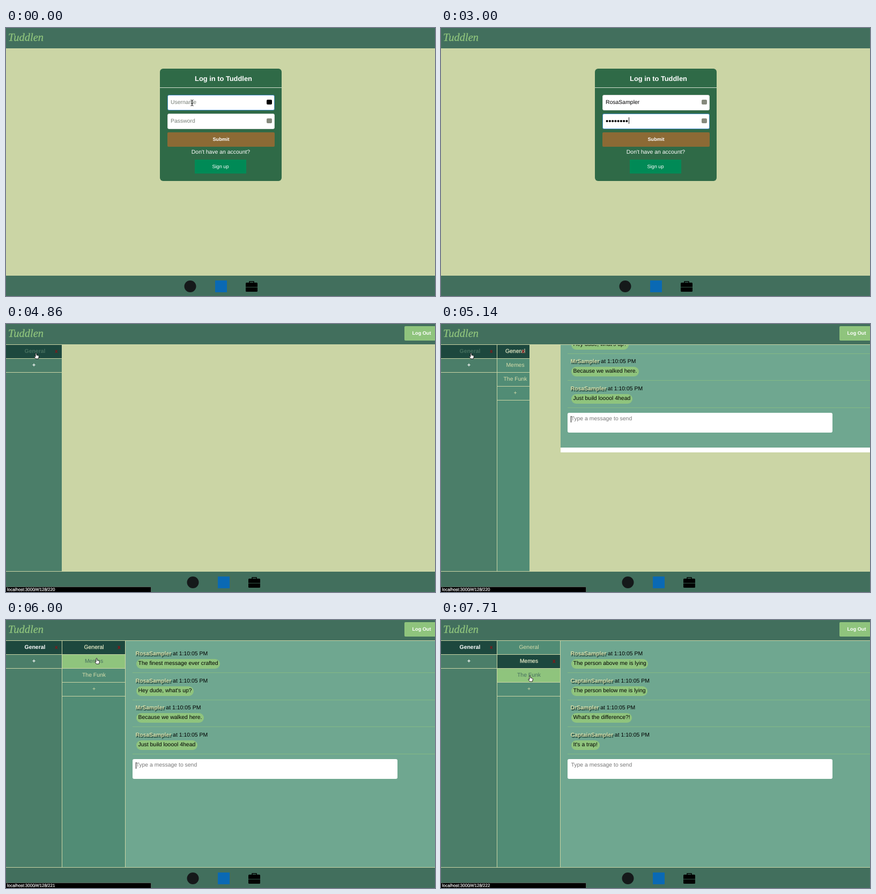
An HTML page that plays this animation: 800 by 501 pixels, repeating every 8000 ms.

```html
<!DOCTYPE html>
<html lang="en">
<head>
<meta charset="utf-8">
<title>Chat login</title>
<style>
  :root { --bar: #426f5d; --cream: #cbd5a5; --lime: #8fc47d; --dark: #1d483e; }
  html, body { margin: 0; width: 100%; height: 100%; overflow: hidden; }
  body { font: 10.45px "Liberation Sans", Arial, sans-serif; text-rendering: geometricPrecision; background: var(--cream); }
  #stage { position: relative; width: 800px; height: 501px; overflow: hidden; background: var(--cream); }
  #stage div, #stage svg { position: absolute; box-sizing: border-box; white-space: nowrap; }
  .mid { text-align: center; }
  .bold { font-weight: bold; }
  .hide { visibility: hidden; }

  #head { left: 0; top: 0; width: 800px; height: 39px; background: var(--bar); border-bottom: 1px solid var(--cream); }
  #logo { left: 4px; top: 5px; font: italic 20.5px/26px "Liberation Serif", serif; color: var(--lime); -webkit-text-stroke: .3px; }
  #logout { left: 743px; top: 4px; width: 64px; height: 27px; line-height: 27px; border-radius: 2px;
    background: var(--lime); color: #fff; font-size: 9.15px; }
  #foot { left: 0; top: 462px; width: 800px; height: 39px; background: var(--bar); border-top: 1px solid var(--cream); }
  #icons { left: 0; top: 0; }

  #card { left: 287px; top: 76px; width: 227px; height: 210px; border-radius: 6px; background: #2f6a47; color: #fff; }
  #title { left: 5px; top: 0; width: 227px; line-height: 38px; font-size: 12.85px; }
  #rule { left: 0; top: 35px; width: 227px; height: 1px; background: #d5e0d0; }
  .field { left: 14px; width: 200px; height: 29px; line-height: 27px; padding-left: 5px; border-radius: 3px;
    border: 1px solid #d9dcd9; background: #fff; color: #000; }
  .field.on { border-color: #4a8fca; }
  .hint { color: #757d75; }
  .key { left: 184px; top: 8px; width: 10px; height: 9px; border-radius: 2px; background: #85897c; }
  .key.hot { background: #000; }
  .caret { display: inline-block; width: 1px; height: 12px; margin-left: .5px; vertical-align: -2px; background: #111; }
  .dots { font-size: 15px; line-height: 1px; vertical-align: -1.5px; }
  #submit { left: 14px; top: 119px; width: 200px; height: 27px; line-height: 27px; border-radius: 2px;
    background: #8c6a35; font-size: 9.15px; }
  #ask { left: 0; top: 150px; width: 227px; line-height: 14px; }
  #join { left: 65px; top: 170px; width: 96px; height: 26px; line-height: 26px; background: #008a56; font-size: 9.2px; }

  #servers, #rooms { top: 39px; height: 423px; overflow: hidden; border-right: 1px solid var(--cream); }
  #servers { left: 0; width: 105px; background: #4b7e69; }
  #rooms { left: 105px; background: #518c75; }
  .row { left: 0; width: 100%; height: 26px; line-height: 25px; border-bottom: 1px solid var(--cream); }
  .name { left: 0; width: 100%; }
  #servers .row { color: #fff; font-weight: bold; }
  #servers .name { left: 2px; }
  #rooms .row { color: #d5dcaa; }
  .row.sel { background: var(--dark); }
  #rooms .row.sel { color: #e2e8c4; -webkit-text-stroke: .25px; }
  .row.over { background: var(--lime); }
  #stage .row.over { color: #47705f; }
  #stage .row.sel { background: var(--dark); }
  #stage .kill { display: none; color: #8a1518; font: bold 10px/26px "Liberation Sans", Arial, sans-serif; }
  #stage .sel .kill { display: block; }

  #panel { left: 223px; top: 39px; width: 577px; overflow: hidden; background: #6fa790; }
  #white { left: 223px; width: 577px; height: 9px; background: #fff; }
  #list { left: 0; width: 577px; height: 286px; }
  .msg { left: 13px; width: 564px; height: 51px; border-bottom: 1px solid #84b985; }
  .who { left: 5.5px; top: 9px; line-height: 14px; color: #000; }
  .who b { color: #d8dda9; text-shadow: 1.5px 1.5px 1px #18382e; }
  .talk { left: 7px; top: 25px; height: 18px; line-height: 18px; padding: 0 3.5px; border-radius: 9px;
    background: var(--lime); color: #000; }
  #write { left: 13px; top: 221px; width: 494px; height: 37px; border-radius: 3px; background: #fff; color: #777; }
  #write div { left: 6.5px; top: 5px; line-height: 14px; }
  #write #blink { left: 6px; top: 6px; width: 1px; height: 12px; background: #111; }
  #status { left: 0; top: 491px; width: 271px; height: 11px; padding-left: 2px; line-height: 10px; font-size: 8px;
    border: 1px solid #55605a; border-left: 0; border-radius: 0 2px 0 0; background: #000; color: #fff;
    -webkit-text-stroke: .2px; }
  #mouse { left: 0; top: 0; overflow: visible; }
</style>
</head>
<body>
<div id="stage">
  <div id="card">
    <div id="title" class="mid bold">Log in to Tuddlen</div>
    <div id="rule"></div>
    <div id="user" class="field" style="top:49px"><span></span><div class="key"></div></div>
    <div id="pass" class="field" style="top:84px"><span></span><div class="key"></div></div>
    <div id="submit" class="mid bold">Submit</div>
    <div id="ask" class="mid">Don't have an account?</div>
    <div id="join" class="mid">Sign up</div>
  </div>
  <div id="app">
    <div id="servers"></div>
    <div id="rooms"></div>
    <div id="panel">
      <div id="list">
        <div id="msgs"></div>
        <div id="write"><div>Type a message to send</div><div id="blink"></div></div>
      </div>
    </div>
    <div id="white"></div>
  </div>
  <div id="head"><div id="logo">Tuddlen</div><div id="logout" class="mid bold">Log Out</div></div>
  <div id="foot">
    <svg id="icons" width="800" height="38">
      <circle cx="343.5" cy="20" r="11" fill="#15191a"/>
      <rect x="390" y="9" width="22" height="22" fill="#0a69b4"/>
      <path d="M454 14v-3h8v3" fill="none" stroke="#000" stroke-width="1.5"/>
      <rect x="447" y="13" width="22" height="17" rx="1.5"/>
      <path d="M447 21.5h22" stroke="#426f5d" stroke-width=".8"/>
    </svg>
  </div>
  <div id="status"></div>
  <svg id="mouse" width="16" height="16">
    <path id="beam" d="M-2.5-5.5Q0-5.5 0-4V4Q0 5.5-2.5 5.5M2.5-5.5Q0-5.5 0-4M0 4Q0 5.5 2.5 5.5M-1.5 1.5h3" fill="none" stroke="#111"/>
    <path id="arrow" d="M0 0V9.5L2.2 7.5 3.7 10.8 5.2 10.1 3.8 7H6.7Z" fill="#000" stroke="#fff" stroke-width=".8"/>
    <path id="hand" d="M-1 1Q0-.8 1 1V4.2L4.5 5Q5.5 5.4 5.3 7L4.5 11H-.6L-3.2 7.2Q-3.2 5.6-1 7.2Z" fill="#fff" stroke="#111" stroke-width=".9"/>
  </svg>
</div>
<script>
const $ = id => document.getElementById(id);
const LOOP = 8000, STEP = 1000 / 7, LAST = 54;
// Moments, counted in steps of a seventh of a second
const TYPE = 7, TAB = 13, LOGIN = 22, MOVE = 25, OPEN = 34, SWITCH = 43;
const NAME = "RosaSampler", LIST = 286;

const chats = [
  [["Rosa", "The finest message ever crafted"], ["Rosa", "Hey dude, what's up?"],
   ["Mr", "Because we walked here."], ["Rosa", "Just build looool 4head"]],
  [["Rosa", "The person above me is lying"], ["Captain", "The person below me is lying"],
   ["Dr", "What's the difference?!"], ["Captain", "It's a trap!"]]
];

// step, x, y of the pointer
const path = [[0, 347, 140], [MOVE, 347, 140], [27, 300, 50], [28, 255, 6], [29, 214, 20],
  [31, 75, 46], [32, 56, 54], [37, 56, 54], [39, 112, 58], [41, 169, 71],
  [49, 169, 72], [51, 166, 104], [LAST, 166, 104]];

function addRows(box, names) {
  return names.map((name, i) => {
    const row = document.createElement("div");
    row.className = "row mid";
    row.style.top = i * 26 + "px";
    row.innerHTML = `<div class="name">${name}</div><div class="kill">x</div>`;
    if (name === "+") row.firstChild.style.left = 0;
    box.append(row);
    return row;
  });
}
const servers = addRows($("servers"), ["General", "+"]);
const rooms = addRows($("rooms"), ["General", "Memes", "The Funk", "+"]);
servers[0].lastChild.style.left = "91px";

const talks = chats.map(chat => chat.map(([who, text], i) =>
  `<div class="msg" style="top:${9 + i * 50.6}px"><div class="who"><b>${who}Sampler</b> at 1:10:05 PM</div>` +
  `<div class="talk">${text}</div></div>`).join(""));

const show = (el, on) => el.classList.toggle("hide", !on);
const clamp = v => Math.max(0, Math.min(1, v));

function pointer(k) {
  const i = Math.max(1, path.findIndex(p => p[0] >= k));
  const [a, b] = [path[i - 1], path[i]];
  const f = clamp((k - a[0]) / (b[0] - a[0]));
  return [a[1] + (b[1] - a[1]) * f, a[2] + (b[2] - a[2]) * f];
}

function field(id, html, hint, focus, hot) {
  const el = $(id), caret = focus ? '<span class="caret"></span>' : "";
  el.classList.toggle("on", focus);
  el.firstChild.innerHTML = html ? html + caret : `<span class="hint">${hint}</span>`;
  el.lastChild.classList.toggle("hot", hot);
}

function login(k) {
  const typed = NAME.slice(0, Math.max(0, 2 * k - 11));
  const count = Math.max(0, Math.min(8, Math.floor((k - 14) * 1.4)));
  const dots = count ? `<span class="dots">${"•".repeat(count)}</span>` : "";
  const first = k < TAB;
  field("user", typed, "Username", first, first);
  field("pass", dots, "Password", !first, false);
}

function chat(k, x, y) {
  const grow = clamp((k - OPEN) / 3.9), open = k >= OPEN;
  const width = 118 * grow, height = Math.round(424 * grow ** 1.19);
  const room = k < SWITCH ? 0 : 1;
  const line = Math.floor((y - 39) / 26);
  const onServer = x < 105 && line === 0;
  const onRoom = open && x >= 105 && x < 105 + width && line >= 0 && line < 3;

  servers[0].classList.toggle("sel", open);
  servers[0].classList.toggle("over", onServer);
  $("rooms").style.width = width + "px";
  show($("rooms"), grow > 0);
  rooms.forEach((row, i) => {
    row.classList.toggle("sel", i === room);
    row.classList.toggle("over", onRoom && i === line);
    row.firstChild.style.width = Math.max(width, 67) + "px";
    row.lastChild.style.left = width - 15 + "px";
  });

  $("panel").style.height = height + "px";
  $("list").style.top = Math.min(0, height - LIST) + "px";
  $("white").style.top = 39 + height + "px";
  show($("panel"), grow > 0);
  show($("white"), grow > 0 && grow < 1);
  if ($("msgs").dataset.room !== String(room)) {
    $("msgs").dataset.room = room;
    $("msgs").innerHTML = talks[room];
  }
  $("blink").style.opacity = (k - (room ? SWITCH : OPEN)) % 7 < 3.5 ? 1 : 0;

  const link = onServer || onRoom;
  if (link) $("status").textContent = "localhost:3000/#/128/" + (220 + line);
  return link;
}

function draw(k) {
  const inside = k >= LOGIN, [x, y] = pointer(k);
  $("card").style.display = inside ? "none" : "";
  $("app").style.display = inside ? "" : "none";
  show($("logout"), inside);
  $("icons").style.left = inside ? "5px" : "0";
  let link = false;
  if (inside) link = chat(k, x, y); else login(k);
  show($("status"), link);

  const kind = k < TYPE ? "beam" : k < MOVE ? "" : link ? "hand" : "arrow";
  for (const id of ["beam", "arrow", "hand"]) $(id).style.display = id === kind ? "" : "none";
  $("mouse").style.transform = `translate(${x}px, ${y}px)`;
}

let shown = -1;
function tick() {
  const t = performance.now() % LOOP;
  const k = Math.min(LAST, Math.floor((t + 5) / STEP));
  if (k !== shown) draw(shown = k);
  requestAnimationFrame(tick);
}
tick();
</script>
</body>
</html>
```
